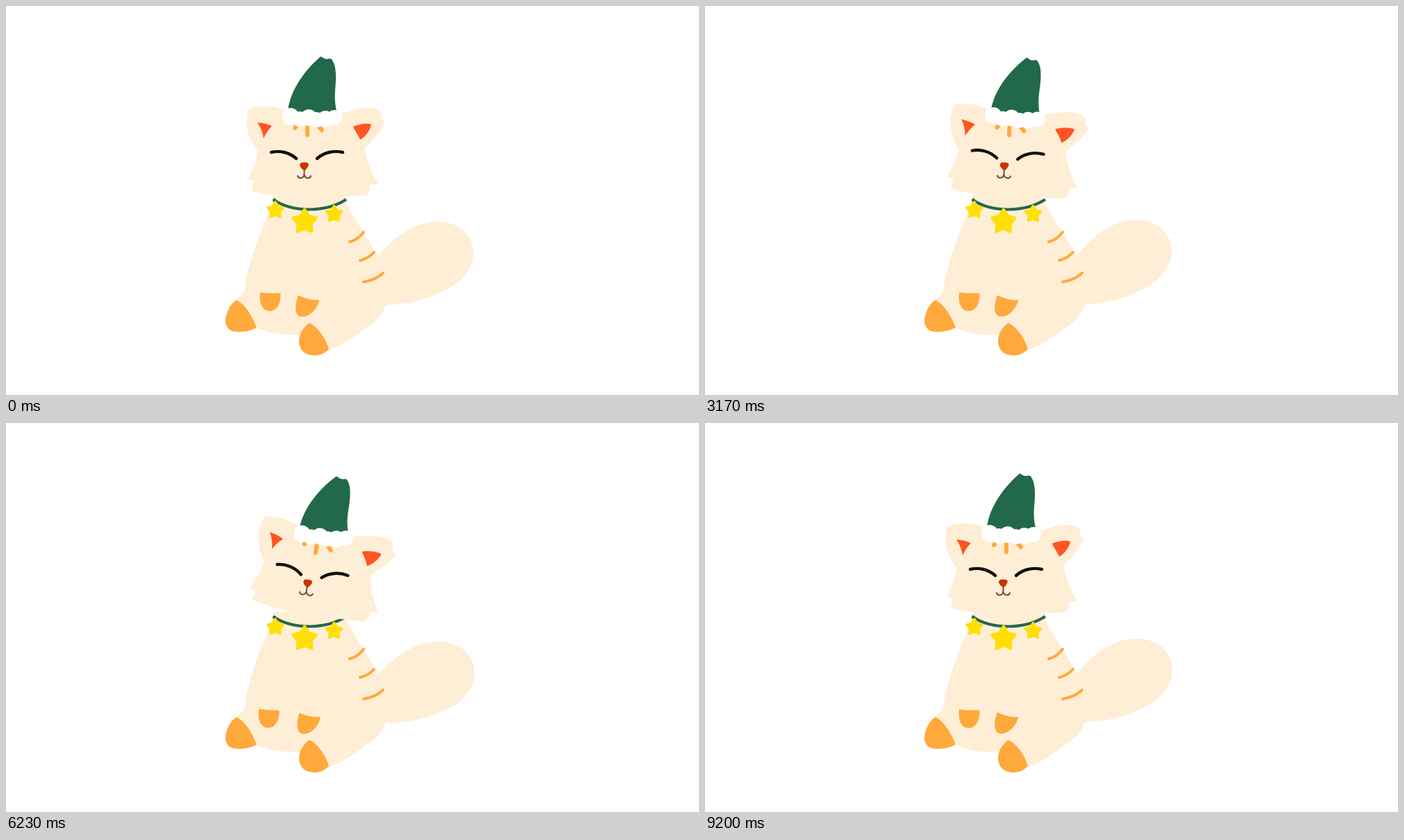
Write an HTML page that moves like this. It is 998 by 561 pixels and loops after 9.51 s.

```html
<!DOCTYPE html>
<html lang="en">
<head>
<meta charset="utf-8">
<title>Festive cat</title>
<style>
  html, body { margin: 0; height: 100%; overflow: hidden; background: #fff; }
  svg { display: block; width: 100%; height: 100%; }
  .cream { fill: #feeed5; }
  .orange { fill: #ffa93d; }
  .red { fill: #ff5522; }
  .line { fill: none; stroke-linecap: round; stroke-linejoin: round; }
  .stripe { stroke: #ffa93d; stroke-width: 4; }
  .eye { stroke: #11100e; stroke-width: 4.4; }
  .star { fill: #ffdf07; stroke: #ffdf07; stroke-width: 5; stroke-linejoin: round; }
</style>
</head>
<body>
<svg viewBox="0 0 998 561">
  <path id="tail" class="cream" d="M505 400 L535 361 C557 337 584 311 622 311 C654 311 673 332 673 356 C673 382 651 402 628 412 C603 424 576 431 546 431 L505 425Z"/>
  <path class="cream" d="M385 272 C383 290 375 305 370 318 C357 350 346 385 343 412 L332 424 L361 464 C380 473 400 475 424 474 L437 457 L465 496 C485 489 500 478 515 467 C533 455 542 447 547 431 C552 410 545 380 535 361 C525 340 503 310 490 285 L488 272Z"/>
  <path class="orange" d="M332 424 C322 430 316 444 316 455 C317 466 324 470 335 470 C346 470 354 467 361 464 C354 446 344 430 332 424Z"/>
  <path class="orange" d="M437 457 C428 463 421 474 422 486 C424 499 433 504 445 504 C453 504 460 500 465 495 C460 478 449 463 437 457Z"/>
  <path id="leftPaw" class="orange" d="M366 413 Q380 415 395 414 C397 424 392 440 380 440 C369 440 364 428 366 413Z"/>
  <path id="rightPaw" class="orange" d="M421 417 Q436 425 451 424 C449 436 438 448 427 448 C414 448 416 430 421 417Z"/>
  <path class="line stripe" d="M495 340 Q507 337 515 326 M510 367 Q522 364 530 355 M515 398 Q533 395 543 385"/>
  <path class="line" stroke="#22684b" stroke-width="4" d="M386 280 C414 298 460 298 490 279" style="stroke-linecap:butt"/>
  <circle cx="386.500" cy="280" r="2.500" fill="#22684b"/>

  <g id="head">
    <g id="leftEar">
      <path class="cream" d="M363 210 C352 195 346 180 346 165 L348 160 C345 155 348 150 353 147 C366 143 384 144 402 150 L402 200Z"/>
      <path class="red" d="M362 168 Q374 169 383 173 Q376 180 371 191 Q369 178 362 168Z"/>
    </g>
    <g id="rightEar">
      <path class="cream" d="M516 206 C530 192 541 180 546 167 L540 162 L540 155 C536 148 528 146 518 147 C506 148 494 152 482 156 L480 205Z"/>
      <path class="red" d="M497 175 Q510 169 524 170 Q527 171 525 175 Q520 187 510 193 Q506 182 497 175Z"/>
    </g>
    <path class="cream" d="M363 207 C361 225 354 237 348 251 L357 252 L354 267 C365 270 377 272 388 273 Q433 281 490 274 L518 273 Q525 271 524 258 L537 257 C526 242 520 224 516 204 L490 156 L400 152Z"/>
    <path class="line stripe" style="stroke-width:6" d="M421 169 L416 176 M434 165 V186 M448 171 L455 179"/>
    <path class="line eye" d="M382 211 C394 208 408 211 418 220 M448 220 C458 211 472 208 485 211"/>
    <path fill="#c93400" d="M425 226 Q429 225 434 226 Q437 228 435 231 Q433 236 429.500 237 Q425 235 423 230 Q423 227 425 226Z"/>
    <path class="line" stroke="#7a4a30" stroke-width="2" d="M429.500 236 V243 C428 250 421 249 420 245 M429.500 243 C431 250 438 249 439 245"/>
    <g id="hat">
      <path fill="#22684b" d="M406 152 C408 128 424 98 453 73 L468 76 C476 84 476 102 474 122 C473 135 474 143 477 156 L440 164Z"/>
      <g fill="#fff">
        <ellipse cx="462" cy="70" rx="8" ry="6.500"/>
        <circle cx="410" cy="159" r="12"/>
        <circle cx="423" cy="163" r="11"/>
        <circle cx="436" cy="161" r="12"/>
        <circle cx="447" cy="164" r="11"/>
        <circle cx="460" cy="163" r="12"/>
        <circle cx="473" cy="161" r="11"/>
      </g>
    </g>
  </g>
  <g id="stars"></g>
</svg>
<script>
const LOOP = 9510, CYCLE = 4770, TILT = 8.9;
const el = id => document.getElementById(id);
const turn = (node, angle, x, y) =>
  node.setAttribute('transform', `rotate(${angle.toFixed(3)} ${x} ${y})`);

const starPoints = Array.from({ length: 10 }, (_, i) => {
  const a = i * Math.PI / 5, r = i % 2 ? 9.5 : 17;
  return `${r * Math.sin(a)},${-r * Math.cos(a)}`;
}).join(' ');

// Each star hangs from a point on the collar.
const stars = [[388, 294.5, 0.69], [430, 311, 1], [472.5, 300, 0.69]].map(([x, y, size]) => {
  const swing = document.createElementNS('http://www.w3.org/2000/svg', 'g');
  swing.innerHTML = `<polygon class="star" points="${starPoints}" transform="translate(${x} ${y}) scale(${size})"/>`;
  el('stars').append(swing);
  return { swing, x, top: y - 20 * size };
});

// Value of a keyframed track, eased in and out between [time, value] pairs.
function track(t, keys) {
  const next = keys.findIndex(([time]) => time > t);
  if (next < 0) return keys[keys.length - 1][1];
  if (next === 0) return keys[0][1];
  const [t0, v0] = keys[next - 1], [t1, v1] = keys[next];
  return v0 + (v1 - v0) * (1 - Math.cos(Math.PI * (t - t0) / (t1 - t0))) / 2;
}

function backOut(t, start, duration) {
  const u = Math.min(Math.max((t - start) / duration, 0), 1) - 1, s = 2.7;
  return 1 + (s + 1) * u ** 3 + s * u ** 2;
}

function tailAngle(t) {
  if (t > 1045 && t < 1945) return 9 * Math.sin((t - 1045) / 450 * Math.PI);
  return track(t, [[3100, 0], [3490, -15.8], [3860, 0]]);
}

function draw(now) {
  const t = now % LOOP % CYCLE;
  const head = TILT * (backOut(t, 290, 620) - backOut(t, 3080, 620));
  const hat = track(t, [[290, 0], [560, 11.5], [1100, 4.3], [3080, 4.3], [3480, -5.3], [3870, -1.8], [4090, 0]]);
  const ears = track(t, [[300, 0], [560, 7.5], [1340, 5.5], [3080, 5.5], [3500, 1], [3870, -3], [4420, 0]]);
  const swing = track(t, [[300, 0], [540, -3], [1000, 0], [3100, 0], [3480, 4.5], [3850, 0]]);
  const paw = t > 410 && t < 2810 ? 2 * Math.sin((t - 410) / 300 * Math.PI) : 0;

  turn(el('head'), head, 431, 263);
  turn(el('hat'), hat - head, 440, 157);
  turn(el('leftEar'), ears, 380, 190);
  turn(el('rightEar'), ears, 505, 190);
  turn(el('tail'), tailAngle(t), 510, 403);
  turn(el('leftPaw'), -paw, 390, 365);
  turn(el('rightPaw'), paw, 440, 370);
  for (const star of stars) turn(star.swing, swing, star.x, star.top);
}

function frame() {
  draw(performance.now());
  requestAnimationFrame(frame);
}
frame();
</script>
</body>
</html>
```
